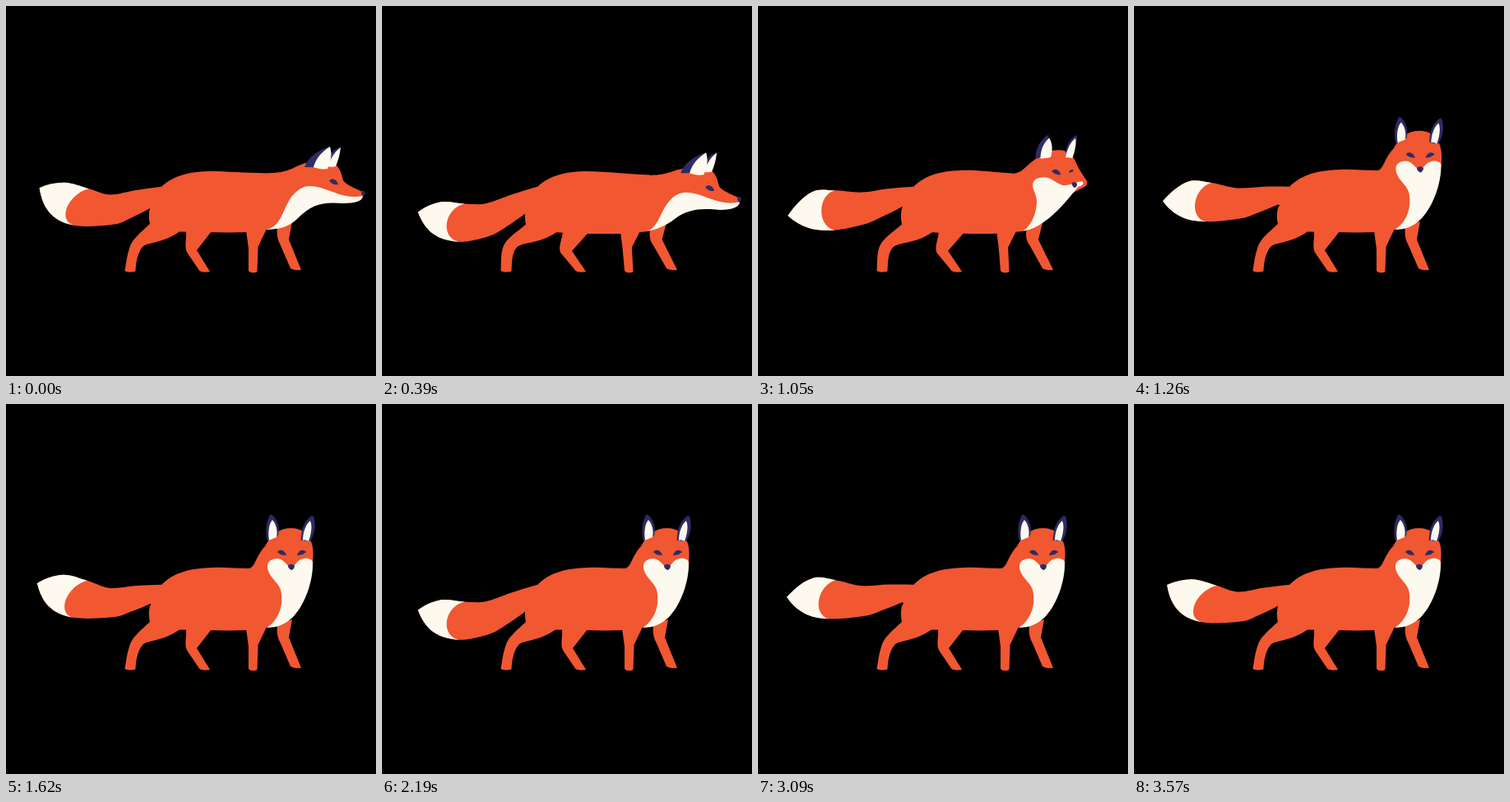
Write an HTML page that moves like this. It is 450 px wide and 450 px high and loops after 3.6 s.

```html
<!DOCTYPE html>
<html lang="en">
<head>
<meta charset="utf-8">
<title>Fox</title>
<style>
  html, body { margin: 0; width: 100%; height: 100%; overflow: hidden; background: #000; }
  svg { display: block; width: 100vw; height: 100vh; }
  .fur { fill: #f15731; }
  .pale { fill: #fef9ee; }
  .navy { fill: #2d2c66; }
</style>
</head>
<body>
<svg id="stage" viewBox="0 0 450 450"></svg>
<script>
const LOOP = 3600, WAG = 1800;
const stage = document.getElementById('stage');

function addPath(cls) {
  const el = document.createElementNS('http://www.w3.org/2000/svg', 'path');
  el.setAttribute('class', cls);
  return stage.appendChild(el);
}

const NUM = /-?\d+(\.\d+)?/g;
const nums = d => d.match(NUM).map(Number);
const clamp = x => Math.min(1, Math.max(0, x));
const smooth = x => x * x * (3 - 2 * x);

// Moves a whole pose by (dx, dy).
function shift(d, dx, dy) {
  let i = 0;
  return d.replace(NUM, n => +n + (i++ % 2 ? dy : dx));
}

// ---- tail: every point swings as c + a cos + b sin: [cx, ax, bx, cy, ay, by]
const TOP = [
  [189, 0, 0, 219.7, 0, 0],
  [158, 0, 0, 224.4, -.5, 5],
  [126, 0, 0, 230.6, -1.2, 10],
  [97.5, 3.3, 2.5, 227.3, -5, 14.5],
  [68.5, 2.5, 2.5, 225.3, -10.5, 15.5],
  [39.4, 1.2, 4.2, 242.7, -21.5, 12.5]
];
const BOTTOM = [
  TOP[5],
  [59.5, -5, 4, 266, -13, 14.3],
  [90, -6, 4.7, 274, -7, 14.5],
  [130, 0, 0, 268.8, -3, 12],
  [152, 0, 0, 259.2, -1.5, 9.2],
  [175, 0, 0, 246.5, -.5, 5.5]
];
const TIP_EDGE = [76.5, -2.5, 3, 251, -5.5, 14];

function swing([cx, ax, bx, cy, ay, by], phase) {
  const c = Math.cos(phase), s = Math.sin(phase);
  return [cx + ax * c + bx * s, cy + ay * c + by * s];
}

const fmt = p => p.map(v => v.toFixed(2)).join(' ');
const curve = (a, b, c) => `C${fmt(a)} ${fmt(b)} ${fmt(c)}`;
const along = (a, b, k) => a.map((v, i) => v + (b[i] - v) * k);

// Smooth cubic segments through the points, with quadratic ends.
function spline(pts) {
  const out = [], last = pts.length - 2;
  for (let i = 0; i <= last; i++) {
    const p = pts[i], q = pts[i + 1];
    let a = i > 0 && p.map((v, k) => v + (q[k] - pts[i - 1][k]) / 6);
    let b = i < last && q.map((v, k) => v - (pts[i + 2][k] - p[k]) / 6);
    if (!a) a = along(p, along(q, b, 1.5), 2 / 3);
    if (!b) b = along(q, along(p, a, 1.5), 2 / 3);
    out.push(curve(a, b, q));
  }
  return out;
}

const tail = addPath('fur'), tailTip = addPath('pale');

function drawTail(phase) {
  const top = TOP.map(p => swing(p, phase));
  const bottom = BOTTOM.map(p => swing(p, phase));
  const mid = swing(TIP_EDGE, phase);
  const up = spline(top), down = spline(bottom);
  tail.setAttribute('d', `M${fmt(top[0])}${up.join('')}${down.join('')}L200 250Z`);

  const w = top[3], v = bottom[2];
  const ctrl = side => mid.map((m, i) =>
    (8 * m - w[i] - v[i]) / 6 + side * .38 * (w[i] - v[i]));
  tailTip.setAttribute('d', `M${fmt(w)}${up[3]}${up[4]}${down[0]}${down[1]}` +
    curve(ctrl(-1), ctrl(1), w) + 'Z');
}

// ---- body parts: standing, crouched and looking poses share one structure
const parts = [];
function part(cls, stand, crouch, look = stand) {
  parts.push({ el: addPath(cls), stand, poses: [stand, crouch, look].map(nums) });
}
const headPart = (cls, stand, look, dy = 15) => part(cls, stand, shift(stand, .3, dy), look);

// far front leg, far hind leg, near front leg
part('fur',
  'M330 268C329 276 330 284 333 289L346 319C349 321.5 356 321.5 359 321L344 284L348 262Z',
  'M322 275C320 284 322 288 326 292L346 319C349 321.5 356 321.5 359 321L337 284L343 268Z');
part('fur',
  'M219 274C220 284 216 294 221 301L234 320C235 324.5 246 324 248 323L232 297L250 274Z',
  'M221 275C218 284 212 292 213 299L234 320C235 324.5 246 324 248 323L230 299L253 276Z');
part('fur',
  'M292 273L295 295L295 322C296 325 304 325 305.5 323L306.5 293L317 271Z',
  'M288 277L290 295L295 322C296 325 304 325 305.5 323L301 294L311 276Z');
// trunk with near hind leg
part('fur',
  'M189 220L175 246C173 254 174 260 175 265C162 277 153 284 150 295C147 304 146 313 144.5 322' +
  'C147 324.3 155 324 157.5 322.5C158 311 160 301 166 293C172 287 190 289 211 274.5' +
  'C240 275 270 276 293 275L316 272C335 268 345 240 345 225L325 203' +
  'C300 204 270 201 250 201C225 201 203 206 189 220Z',
  'M189 220L175 246C173 254 174 260 175 266C162 276 152 280 146 287C141 295 144 310 144.5 322' +
  'C147 324.3 155 324 157.5 322.5C158 311 156 301 160 296C168 285 190 292 213 276' +
  'C240 279 270 279 290 279L329 276.5C340 272 350 245 350 230L325 208' +
  'C305 206 270 201 250 201C225 201 203 206 189 220Z',
  'M189 220L175 246C173 254 174 260 175 265C162 277 153 284 150 295C147 304 146 313 144.5 322' +
  'C147 324.3 155 324 157.5 322.5C158 311 160 301 166 293C172 287 190 289 211 274.5' +
  'C240 275 270 276 293 275L316 272C335 268 340 240 335 225L296 200' +
  'C280 200 265 198 250 199C225 200 205 204 189 220Z');
// head
part('fur',
  'M322 203C345 203 352 194 364 191C375 188 392 189 401 193C407 199 408 204 410 212' +
  'C413 217 425 222 436 227L434 232L380 232L335 262L305 260Z',
  'M322 208C345 211 352 207 364 206C375 203 392 204 401 208C407 214 408 219 410 227' +
  'C413 232 425 237 436.5 242L435 248L382 248L338 263L312 265Z',
  'M293 200.5C304 200 302 187 315 173C323 158 333 151 347 151C358 151 366 156 371 167' +
  'C374 175 374 184 373 192L372.5 196L350 230L335 255L305 250Z');
// chest and muzzle
part('pale',
  'M316 272C330 269 334 258 340 245C344 237 347 231 352 227C357 222 363 219 369 219' +
  'C380 219 388 223 400 227C412 232 424 233 434 231C434 237 425 240 410 240' +
  'C385 238 372 241 355 258C345 269 330 272 316 272Z',
  'M329 276C336 270 339 261 344 252C348 246 352 242 356 239C360 236 365 235 370 235' +
  'C381 235 389 239 401 243C412 247.5 425 248.5 436 246.5C436 252 427 257 411 256.5' +
  'C388 254 372 254 357 260C346 265 339 272 329 276Z',
  'M317 272C330 264 337 248 335 232C335 217 318 212 318 197C318 191 324 188 330 188' +
  'C338 188 341 197 347 199C352 197 354 189 362 188C367 187 372 189 373 192' +
  'C374 214 364 243 350 258C340 268 331 272 317 272Z');
// right ear
headPart('navy',
  'M394 181C397 176 402 173 407 172C403 178 399 184 395 192Z',
  'M359 166C358 152 365 139 373 135.5C377 142 377 156 370 167Z', 13.5);
headPart('pale',
  'M391 195C395 185 400 177 407 172C406 181 404 188 401 195C398 196 394 196 391 195Z',
  'M361 166C361 154 366 145 370 142C373 148 371 159 368 167C366 166 363 165 361 166Z', 13.5);
// left ear
headPart('navy',
  'M363 196C367 184 380 175 394 171C388 178 378 186 374 196Z',
  'M318 167C314 152 318 139 322 134C329 138 334 150 331 160Z');
headPart('pale',
  'M374 196C377 184 385 177 394 171C397 180 395 190 391 198C385 199 380 198 374 196Z',
  'M320 166C318 153 321 144 324 141C328 145 331 154 329 162C326 163 322 165 320 166Z');
// eyes and nose
headPart('navy',
  'M393 212C397 209 402 210 404 217C399 218 395 216 393 212Z',
  'M330 180C332 176 339 177 341 184C336 184 333 183 330 180Z', 16);
headPart('navy',
  'M409 212C409 212 409 212 409 212C409 212 409 212 409 212Z',
  'M354 184C356 177 362 176 365 180C362 183 358 184 354 184Z');
headPart('navy',
  'M432 225C434 224 436 225 436.5 227C437 230 435 231 433.5 231C432 229 432 227 432 225Z',
  'M343 197C344 194 350 194 351 197C351 200 348 202 347 202C345 201 343 199 343 197Z');

function drawParts(crouch, look) {
  for (const { el, stand, poses: [a, b, c] } of parts) {
    let i = 0;
    el.setAttribute('d', stand.replace(NUM, () => {
      const low = a[i] + (b[i] - a[i]) * crouch;
      return (low + (c[i++] - low) * look).toFixed(2);
    }));
  }
}

function frame() {
  const t = performance.now() % LOOP;
  const crouch = smooth(clamp(t / 800));
  const look = smooth(1 - Math.pow(1 - clamp((t - 840) / 490), 1.4));
  drawTail(t / WAG * 2 * Math.PI);
  drawParts(crouch, look);
  requestAnimationFrame(frame);
}
frame();
</script>
</body>
</html>
```
